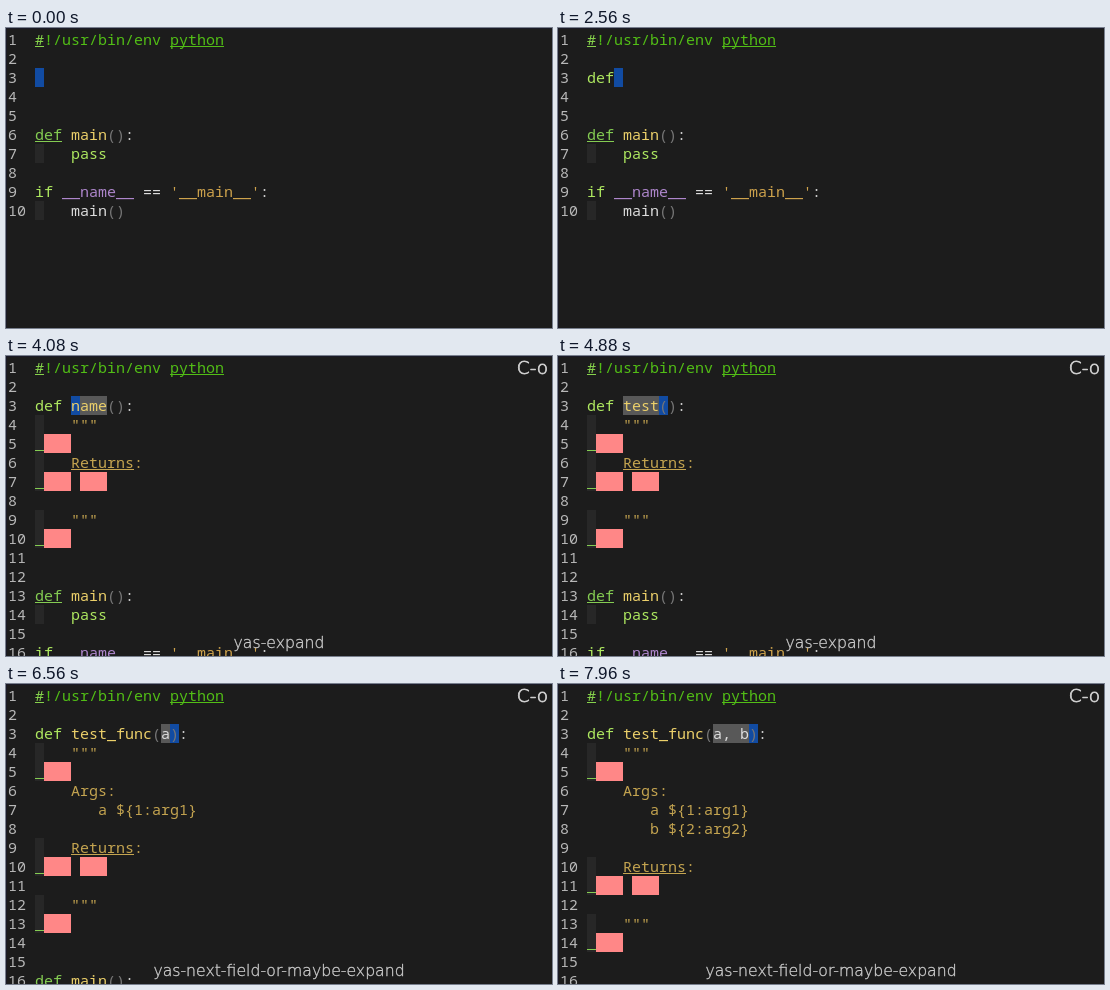
These frames come from a looping animation (546x300 px, 8000 ms). An HTML page with a canvas:

```html
<!DOCTYPE html>
<html lang="en">
<head>
<meta charset="utf-8">
<title>Snippet expansion in an editor</title>
<style>
html, body { margin: 0; width: 100%; height: 100%; overflow: hidden; background: #1c1c1c; }
canvas { display: block; }
</style>
</head>
<body>
<canvas id="stage" width="546" height="300"></canvas>
<script>
const ctx = document.getElementById('stage').getContext('2d');
const LOOP = 8000, CW = 9, LH = 19, LEFT = 29, TOP = 2;
const MONO = '15px "Noto Sans Mono", "DejaVu Sans Mono", monospace';
const SANS = '"DejaVu Sans Light", "DejaVu Sans", sans-serif';

const C = {
  bg: '#1c1c1c', edge: '#1b1b28', guide: '#272727', num: '#b8b8b8',
  plain: '#dcdcdc', comment: '#52be16', mark: '#86d24c', key: '#aee860',
  warn: '#84cc52', fn: '#ecd06a', paren: '#767676', name: '#ae86cc',
  str: '#cda24c', doc: '#c4a450', pink: '#ff8787', cursor: '#114ba2',
  field: '#585858', match: '#6a84b0', label: '#cecece'
};

// Each step overrides parts of the state before it.
const steps = [
  [0, { typed: '' }],
  [1720, { typed: 'd' }],
  [2040, { typed: 'de' }],
  [2360, { typed: 'def' }],
  [2640, { typed: 'defg' }],
  [3200, { name: 'name', fresh: true, label: 'yas-expand' }],
  [4000, { lint: true }],
  [4280, { name: 't', fresh: false }],
  [4400, { match: true }],
  [4480, { name: 'te', match: false }],
  [4600, { match: true }],
  [4680, { name: 'tes', match: false }],
  [4800, { match: true }],
  [4880, { name: 'test', match: false }],
  [5080, { match: true }],
  [5160, { name: 'test_', match: false }],
  [5240, { match: true }],
  [5320, { name: 'test_f', match: false }],
  [5400, { match: true }],
  [5440, { name: 'test_fu', match: false }],
  [5520, { match: true }],
  [5560, { name: 'test_fun', match: false }],
  [5680, { match: true }],
  [5840, { name: 'test_func', match: false }],
  [5960, { match: true }],
  [6200, { inArgs: true, match: false, label: 'yas-next-field-or-maybe-expand' }],
  [6520, { args: 'a' }],
  [7200, { args: 'a,' }],
  [7360, { args: 'a, ' }],
  [7680, { args: 'a, b' }]
];

function stateAt(t) {
  const s = { name: '', args: '' };
  for (const [start, change] of steps) if (t >= start) Object.assign(s, change);
  return s;
}

const colX = col => LEFT + col * CW;
const rowY = row => TOP + (row - 1) * LH;

function cell(row, col, count, color) {
  ctx.fillStyle = color;
  ctx.fillRect(colX(col), rowY(row), count * CW, LH);
}

function underline(row, col, count, color) {
  ctx.fillStyle = color;
  ctx.fillRect(colX(col), rowY(row) + 16, count * CW, 1);
}

// Parts are [text, color, underlined].
function write(row, col, ...parts) {
  for (const [text, color, line] of parts) {
    if (line) underline(row, col, text.length, color);
    ctx.fillStyle = color;
    ctx.fillText(text, colX(col), rowY(row) + 15);
    col += text.length;
  }
}

const guide = row => cell(row, 0, 1, C.guide);

function blank(row, lint, second) {
  guide(row);
  cell(row, 1, 3, C.pink);
  if (second) cell(row, 5, 3, C.pink);
  if (lint) underline(row, 0, 1, C.warn);
}

function drawMain(row) {
  guide(row + 1);
  guide(row + 4);
  write(row, 0, ['def', C.warn, true], [' ', C.plain], ['main', C.fn], ['()', C.paren], [':', C.plain]);
  write(row + 1, 4, ['pass', C.key]);
  write(row + 3, 0, ['if', C.key], [' ', C.plain], ['__name__', C.name],
    [' == ', C.plain], ["'__main__'", C.str], [':', C.plain]);
  write(row + 4, 4, ['main', C.plain], ['()', C.paren]);
}

function drawHeader(s) {
  const open = 4 + s.name.length, close = open + 1 + s.args.length;
  if (s.inArgs) {
    cell(3, open + 1, s.args.length, C.field);
    cell(3, close, 1, C.cursor);
  } else {
    cell(3, 4, s.name.length, C.field);
    cell(3, s.fresh ? 4 : open, 1, C.cursor);
    if (s.match) cell(3, close, 1, C.match);
  }
  write(3, 0, ['def', C.key], [' ', C.plain], [s.name, C.fn], ['(', C.paren],
    [s.args, C.plain], [')', s.match ? C.plain : C.paren], [':', C.plain]);
}

// Draws the expanded function and returns the row of its last line.
function drawFunction(s) {
  drawHeader(s);
  guide(4);
  write(4, 4, ['"""', C.doc]);
  blank(5, s.lint);
  let row = 6;
  const args = s.args.split(/\s*,\s*/).filter(Boolean);
  if (args.length) {
    write(row++, 4, ['Args:', C.doc]);
    args.forEach((arg, i) => write(row++, 7, [`${arg} \${${i + 1}:arg${i + 1}}`, C.doc]));
    row++;
  }
  guide(row);
  write(row, 4, ['Returns', C.doc, true], [':', C.doc]);
  blank(row + 1, s.lint, true);
  guide(row + 3);
  write(row + 3, 4, ['"""', C.doc]);
  blank(row + 4, s.lint);
  return row + 4;
}

// A thin outline thickens the light face.
function drawLabel(text, x, y, align, size, outline) {
  ctx.font = `200 ${size}px ${SANS}`;
  ctx.textAlign = align;
  ctx.fillStyle = ctx.strokeStyle = C.label;
  ctx.lineWidth = outline;
  ctx.lineJoin = 'round';
  ctx.fillText(text, x, y);
  ctx.strokeText(text, x, y);
}

function draw(t) {
  const s = stateAt(t);
  ctx.fillStyle = C.bg;
  ctx.fillRect(0, 0, 546, 300);
  ctx.fillStyle = C.edge;
  ctx.fillRect(0, 0, 546, 1);
  ctx.fillRect(0, 0, 1, 300);
  ctx.font = MONO;
  ctx.textAlign = 'left';
  ctx.textBaseline = 'alphabetic';

  const lines = s.label ? 16 : 10;
  for (let i = 1; i <= lines; i++) write(i, -3, [String(i), C.num]);
  write(1, 0, ['#', C.mark, true], ['!/usr/bin/env ', C.comment], ['python', C.comment, true]);

  if (s.label) {
    drawMain(drawFunction(s) + 3);
    drawLabel(s.label, 273, 292, 'center', 15.7, 0.35);
    drawLabel('C-o', 542, 18, 'right', 18.5, 0.8);
  } else {
    cell(3, s.typed.length, 1, C.cursor);
    write(3, 0, [s.typed, s.typed === 'def' ? C.key : C.plain]);
    drawMain(6);
  }
}

const begin = performance.now();
function tick() {
  draw((performance.now() - begin) % LOOP);
  requestAnimationFrame(tick);
}
tick();
</script>
</body>
</html>
```
